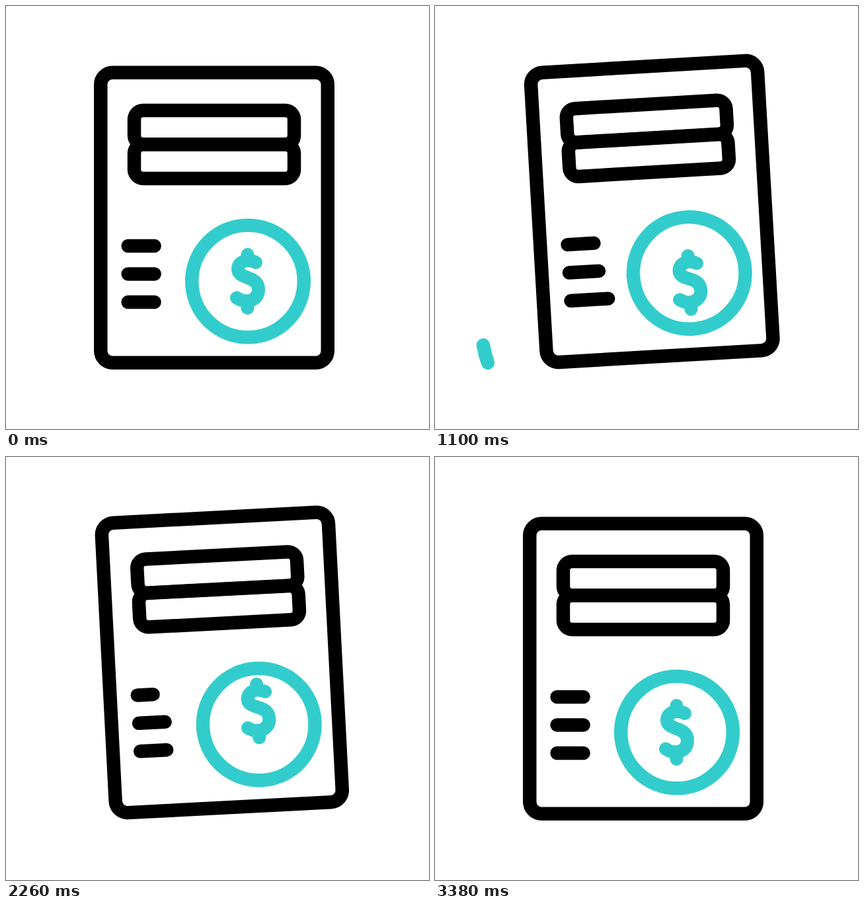
An HTML page that plays this animation: 640x640 px, repeating every 3.52 s.

```html
<!DOCTYPE html>
<html lang="en">
<head>
<meta charset="utf-8">
<title>Swinging bill</title>
<style>
  html, body { margin: 0; width: 100%; height: 100%; overflow: hidden; background: #fff; }
  svg { display: block; width: 100vw; height: 100vh; }
  .ink { stroke: #000; }
  .teal { stroke: #33cccc; }
</style>
</head>
<body>
<svg viewBox="0 0 640 640" fill="none" stroke-width="20.5" stroke-linecap="round">
  <defs>
    <clipPath id="coin"><circle cx="366" cy="416.5" r="90"/></clipPath>
    <path id="dollar" stroke-width="20" d="M378 388C365 381 351 387 351 398C351 414 382 407 382 429C382 446 363 451 349 441.5M365.5 376V384M365.5 447V457"/>
  </defs>
  <g class="teal">
    <path id="right" pathLength="1" d="M410 590C490 625 598 580 568 488"/>
    <path id="left" pathLength="1" d="M234 584C160 622 88 602 73 513"/>
  </g>
  <g id="page">
    <g class="ink">
      <rect x="143.25" y="100.75" width="343.5" height="439" rx="18" fill="#fff"/>
      <rect x="194" y="158" width="242" height="51.2" rx="13.5"/>
      <rect x="194" y="209.6" width="242" height="51.4" rx="13.5"/>
      <path class="row"/><path class="row"/><path class="row"/>
    </g>
    <g class="teal">
      <g clip-path="url(#coin)">
        <g id="reel">
          <use href="#dollar"/>
          <use href="#dollar" y="-148"/>
        </g>
      </g>
      <circle cx="366" cy="416.5" r="84.8"/>
    </g>
  </g>
</svg>
<script>
const LOOP = 3520, GAP = 148;
const $ = id => document.getElementById(id);
const rows = document.querySelectorAll('.row');

// Smooth curve through [time, value] keys, flat at its ends and turning points.
function track(keys) {
  const rise = keys.slice(1).map(([t, v], i) => (v - keys[i][1]) / (t - keys[i][0]));
  const slope = keys.map((_, i) => {
    const a = rise[i - 1], b = rise[i];
    return a * b > 0 ? 2 * a * b / (a + b) : 0;
  });
  return t => {
    if (t <= keys[0][0]) return keys[0][1];
    const i = keys.findIndex(k => k[0] > t) - 1;
    if (i < 0) return keys[keys.length - 1][1];
    const [t0, v0] = keys[i], [t1, v1] = keys[i + 1];
    const h = t1 - t0, u = (t - t0) / h, w = 1 - u;
    return v0 * (1 + 2 * u) * w * w + v1 * (3 - 2 * u) * u * u
      + h * u * w * (slope[i] * w - slope[i + 1] * u);
  };
}

const angle = track([[360, 0], [925, -6], [1500, 6], [2070, -6], [2650, 6], [2910, 4.3], [3150, -7.25], [3380, 0]]);
const lift = track([[220, 0], [740, -28], [1320, 0], [1900, -28], [2480, 0], [2900, 0], [3150, -49], [3380, 0]]);
const turns = track([[220, 0], [820, .61], [1380, 1.7], [1760, 2.65], [2260, 3.86], [2860, 5.2], [3380, 6]]);
const stretch = track([[0, 0], [340, 20], [880, -18], [1300, 0]]);
const rowStart = [1300, 990, 665];

const ease = (t, from, to) => track([[from, 0], [to, 1]])(t);

function trim(path, start, end) {
  path.style.display = end - start > .002 ? '' : 'none';
  path.setAttribute('stroke-dasharray', `${end - start} 3`);
  path.setAttribute('stroke-dashoffset', -start);
}

function draw(now) {
  const t = now % LOOP;
  $('page').setAttribute('transform', `translate(0 ${lift(t)}) rotate(${angle(t)} 315 91)`);
  $('reel').setAttribute('transform', `translate(0 ${turns(t) % 1 * GAP})`);
  rows.forEach((row, i) =>
    row.setAttribute('d', `M184.6 ${363 + 42.5 * i}H${224.6 + stretch(t - rowStart[i])}`));
  trim($('right'), ease(t, 520, 840), ease(t, 320, 640));
  trim($('left'), ease(t, 830, 1180), ease(t, 440, 880));
  requestAnimationFrame(draw);
}
draw(performance.now());
</script>
</body>
</html>
```
